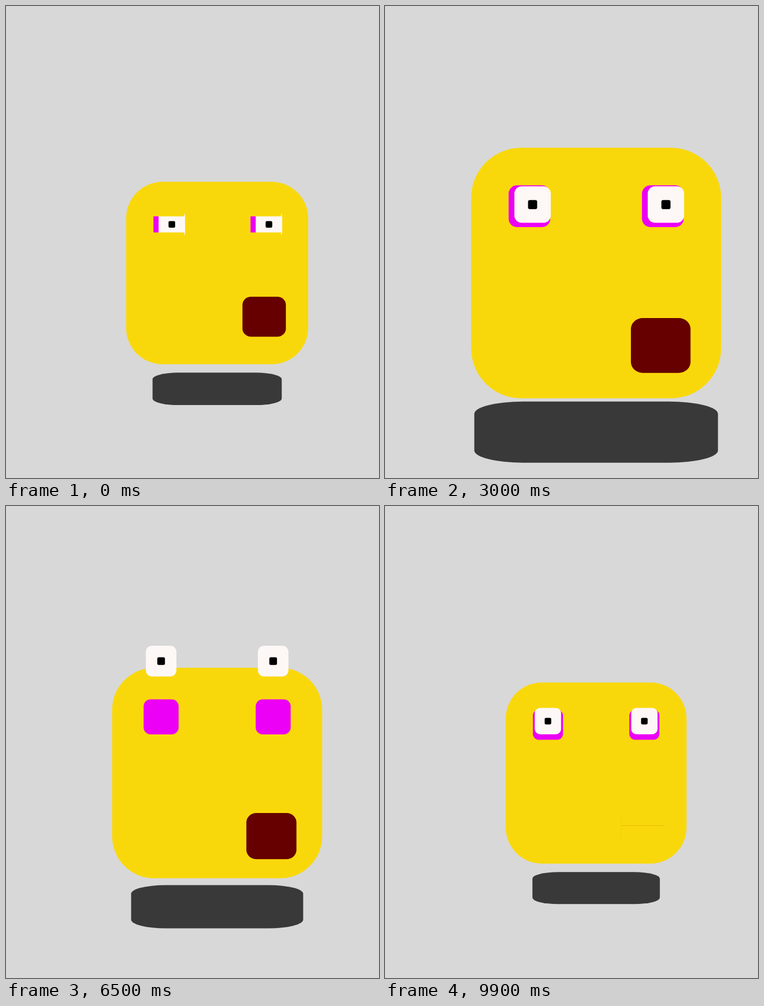
These frames come from a looping animation (666 by 841 pixels, 10 s). An HTML page with a canvas:

```html
<!DOCTYPE html>
<html>
<head>
<meta charset="utf-8">
<style>
html, body { margin: 0; width: 100%; height: 100%; overflow: hidden; background: #d8d8d8; }
canvas { display: block; }
</style>
</head>
<body>
<canvas id="stage" width="666" height="841"></canvas>
<script>
const ctx = document.getElementById('stage').getContext('2d');
const LOOP = 10000, LEAD = 245;
const YELLOW = '#f9d80b';

// [time, x, y] in eye widths; repeats every 6 s
const GAZE = [
  [0, .113, 0], [245, .107, 0], [745, 0, -1.59], [1150, 0, -1.6], [1500, 0, 0],
  [2745, 0, 0], [3245, .075, -.04], [3700, 1, 0], [4145, 0, -.12],
  [4945, -.113, 0], [5500, -.113, 0], [6000, .113, 0]
];
// [time, drop] in mouth heights; repeats every 4 s
const DROP = [
  [0, .08], [245, .03], [700, 0], [950, 0], [2045, .25],
  [2745, .305], [3245, .257], [4000, .08]
];

const smooth = k => k * k * (3 - 2 * k);

function track(points, time, curve = k => k) {
  const i = points.findIndex(p => p[0] > time);
  const a = points[i - 1], b = points[i];
  const k = curve((time - a[0]) / (b[0] - a[0]));
  return a.slice(1).map((v, n) => v + (b[n + 1] - v) * k);
}

// The CSS "ease" curve
function ease(x) {
  const bez = (u, a, b) => 3 * a * u * (1 - u) ** 2 + 3 * b * u * u * (1 - u) + u ** 3;
  let lo = 0, hi = 1;
  for (let i = 0; i < 24; i++) {
    const mid = (lo + hi) / 2;
    if (bez(mid, .25, .25) < x) lo = mid; else hi = mid;
  }
  return bez(lo, .1, 1);
}

// Centred box whose corners are a fifth of each side
function box(x, y, w, h, color) {
  ctx.fillStyle = color;
  ctx.beginPath();
  ctx.roundRect(x - w / 2, y - h / 2, w, h, [{ x: w / 5, y: h / 5 }]);
  ctx.fill();
}

function lids(x, y, w, h, cover) {
  if (cover <= 0) return;
  ctx.fillStyle = YELLOW;
  const d = h * cover + 1;
  ctx.fillRect(x - w / 2 - .5, y - h / 2 - 1, w + 1, d);
  ctx.fillRect(x - w / 2 - .5, y + h / 2 + 1 - d, w + 1, d);
}

const blink = (time, mid, half) => Math.min(.5, .52 * (1 - Math.abs(time - mid) / half));

function draw(t) {
  const time = t + LEAD;
  const half = time % LOOP / 5000;
  const p = half < 1 ? ease(half) : 1 - ease(half - 1);
  const scale = .7 + .3 * p;
  const size = 458 * scale;
  const cx = 377, cy = 475.8;

  ctx.fillStyle = '#d8d8d8';
  ctx.fillRect(0, 0, 666, 841);

  box(cx, cy, size, size, YELLOW);
  box(cx, cy + size * .635, size * scale, size * scale / 4, '#393939');

  const eye = size / 6, white = eye * .873;
  const [gx, gy] = track(GAZE, time % 6000, smooth);
  const eyeY = cy - size * .2667;
  for (const side of [-1, 1]) {
    const eyeX = cx + side * size * .2667;
    const x = eyeX + gx * eye, y = eyeY + gy * eye;
    box(eyeX, eyeY, eye, eye, '#ec00f6');
    box(x, y, white, white, '#fdf7f6');
    box(x, y, white / 4, white / 4, '#000');
    lids(eyeX, eyeY, eye, eye, blink(time % 4000, 150, 175));
  }

  const mw = size * .2385, mh = size * .219;
  const [drop] = track(DROP, time % 4000);
  const mx = cx + size * .2583, my = cy + size * .2328 + drop * mh;
  box(mx, my, mw, mh, '#660000');
  lids(mx, my, mw, mh, blink(time % 4000, 2150, 145));
}

function frame(now) {
  draw(now % LOOP);
  requestAnimationFrame(frame);
}
requestAnimationFrame(frame);
</script>
</body>
</html>
```
